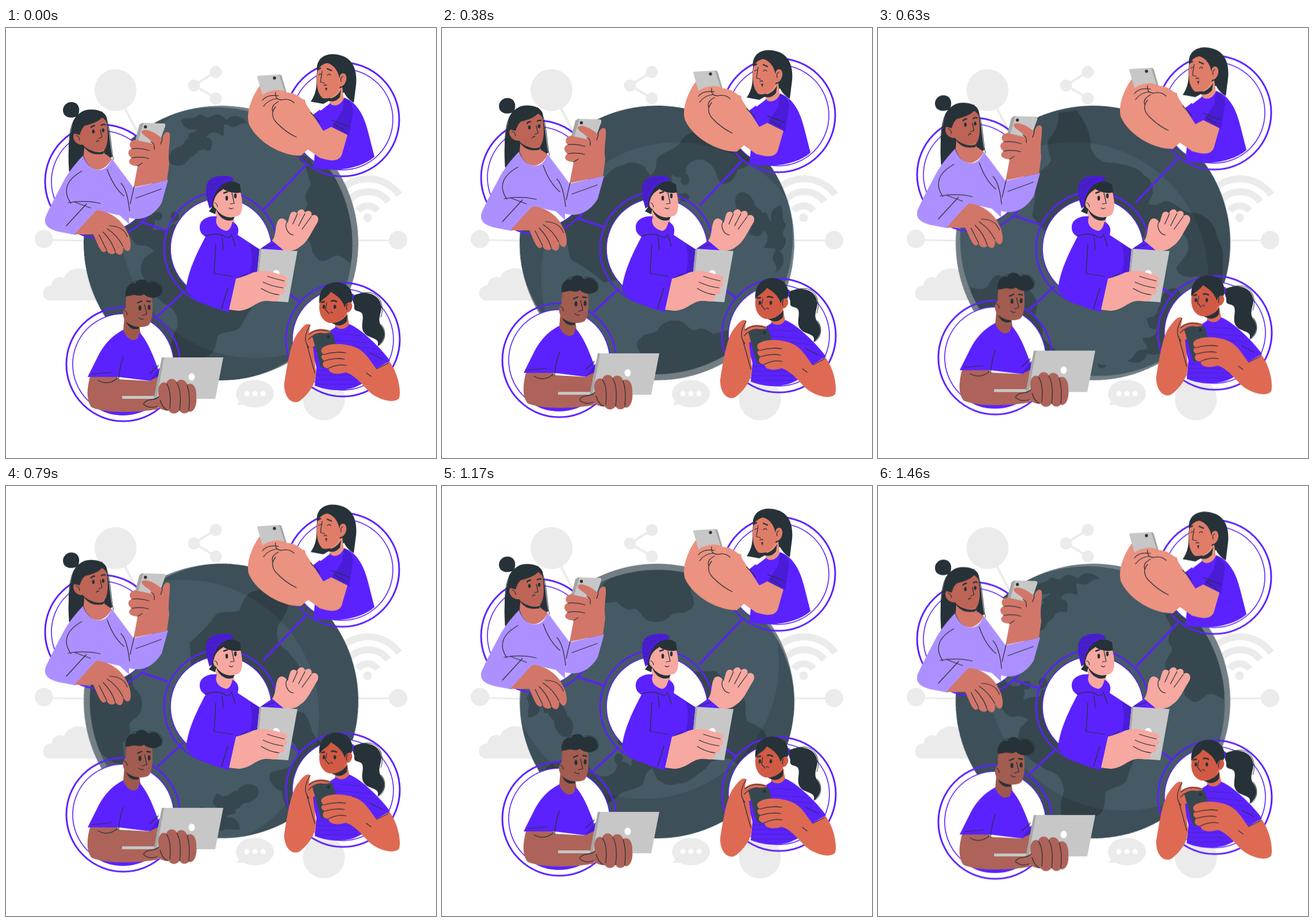
Animation of 748 by 748 pixels, one loop 1.5 s. Source, as an HTML page without scripts:

```html
<!DOCTYPE html>
<html lang="en">
<head>
<meta charset="utf-8">
<title>Connected people</title>
<style>
html, body { margin: 0; width: 100%; height: 100%; overflow: hidden; background: #fff; }
svg { display: block; width: 100%; height: 100%; }
.globe { transform-origin: 374px 374px; animation: spin 1.5s linear infinite; }
.bob { animation: bob 1.5s linear infinite; }
@keyframes spin { to { transform: rotate(360deg); } }
@keyframes bob { 50% { transform: translateY(-14px); } }
.bg { fill: #ebebeb; }
.bgline { fill: none; stroke: #ebebeb; stroke-width: 3.5; }
.land { fill: #37474f; }
.purple { fill: #5b22ff; }
.deep { fill: #4a1cd8; }
.lilac { fill: #ad90ff; }
.dark { fill: #263238; }
.grey { fill: #c7c7c7; }
.edge { fill: #a6a6a6; }
.white { fill: #fff; }
.ln { fill: none; stroke: #263238; stroke-width: 1.25; stroke-linecap: round; stroke-linejoin: round; }
.brow { stroke-width: 2.4; }
.hair { stroke-width: 1; }
.link { fill: none; stroke: #5b22ff; stroke-width: 3.5; }
</style>
</head>
<body>
<svg viewBox="0 0 748 748">
<defs>
  <clipPath id="disc"><circle cx="374" cy="374" r="239"/></clipPath>
  <clipPath id="sea"><circle cx="363.5" cy="377" r="239"/></clipPath>
  <g id="ring">
    <circle r="88" fill="#fff" stroke="#5b22ff" stroke-width="1.6"/>
    <circle r="99" fill="none" stroke="#5b22ff" stroke-width="3"/>
  </g>
</defs>

<!-- backdrop icons -->
<g class="bgline">
  <path d="M206 138L236 196M365 76L327 100L365 122" stroke-width="4"/>
  <path d="M66 368.500L140 370M608 369.500H682" stroke-width="3"/>
  <path d="M574 292A67 67 0 0 1 684 290M595 302A44 44 0 0 1 665 302M612 318A21 21 0 0 1 646 318" stroke-width="12"/>
</g>
<g class="bg">
  <circle cx="190.500" cy="108" r="36.500"/><circle cx="553" cy="646" r="36.500"/>
  <circle cx="365" cy="76.500" r="10.500"/><circle cx="327" cy="100" r="10.500"/><circle cx="365" cy="122.500" r="10.500"/>
  <circle cx="66" cy="367" r="16"/><circle cx="682" cy="369" r="16"/><circle cx="629" cy="330" r="7.500"/>
  <path d="M77 474C60 474 60 448 79 448C80 436 92 430 101 435C108 414 142 412 150 432L176 474Z"/>
  <path d="M407 648L401 656L418 655Z"/><ellipse cx="433" cy="636" rx="33" ry="24"/>
</g>
<g class="white"><circle cx="419" cy="636" r="4.500"/><circle cx="433" cy="636" r="4.500"/><circle cx="447" cy="636" r="4.500"/></g>

<!-- globe -->
<g class="globe" clip-path="url(#disc)">
  <circle cx="374" cy="374" r="239" fill="#737f85"/>
  <g clip-path="url(#sea)">
    <circle cx="374" cy="374" r="239" fill="#455a64"/>
    <g class="land">
      <path d="M241 400C234 412 232 425 240 436C242 456 262 466 275 480C292 485 300 500 299 520C288 540 284 560 289 590L319 602C324 588 334 578 349 572C362 570 366 552 369 535C382 526 404 530 410 518C418 500 428 486 445 465L430 400L290 340L262 385Z"/>
      <path d="M258 388C245 376 238 380 228 378C213 366 212 346 198 338C180 328 172 305 178 285C182 270 178 256 189 242L208 207C222 200 238 216 243 237C258 240 272 252 268 266C256 274 238 276 232 289C222 302 228 320 243 327C262 325 262 340 254 352C270 350 284 348 290 356Z"/>
      <path d="M252 326C264 314 277 324 270 333C264 339 256 332 252 326M286 326C292 314 304 322 300 334L288 339ZM244 402C252 388 270 400 264 410Z"/>
      <path d="M303 160C314 154 329 160 334 151C343 149 346 158 355 155C364 145 376 152 383 160C392 148 412 152 420 167C408 160 400 176 390 171L380 167C374 174 382 182 376 188C364 178 351 182 348 190C362 194 358 203 355 213C348 216 344 208 338 213C332 212 330 224 319 225C314 240 296 244 285 236C276 222 290 212 298 207C312 206 306 196 318 192C310 181 330 184 331 176C319 180 307 175 303 160Z"/>
      <path d="M520 240C532 230 548 240 560 246C574 256 580 270 586 283C594 292 592 312 600 330L612 360L599 409C588 400 582 392 570 396C560 403 548 410 541 399C528 390 536 374 522 367C508 358 506 340 509 329C514 318 525 314 524 304C516 292 524 282 530 272Z"/>
      <path d="M508 221C520 218 530 226 532 236C520 238 508 232 508 221M482 194C492 184 508 194 505 207C496 206 489 202 482 194M455 176C465 170 472 180 468 186Z"/>
    </g>
    <path fill="#000" opacity=".12" fill-rule="evenodd" d="M100 100H700V700H100ZM198 338a236 236 0 1 0 472 0a236 236 0 1 0 -472 0Z"/>
  </g>
</g>

<!-- rings and links -->
<g class="bob">
  <path class="link" d="M236 338L281 353M522 238L448 316M308 460L263 502M494 464L511 476"/>
  <use href="#ring" x="167" y="267"/><use href="#ring" x="585" y="159"/>
  <use href="#ring" x="204" y="585"/><use href="#ring" x="586" y="542"/>
</g>
<use href="#ring" x="374" y="384"/>

<!-- centre: man with tablet -->
<g fill="#f7a8a0">
  <path d="M366 312L363 345L381 358L399 344L394 322Z"/>
  <path class="purple" d="M337 347C337 331 356 326 367 328C362 340 370 350 383 353C390 352 392 344 394 337C404 342 406 350 403 360L441 385L463 370L490 390L475 408L436 420L424 429L402 436L388 494C360 488 326 474 313 456C316 422 334 388 347 363C340 359 337 354 337 347Z"/>
  <path class="deep" d="M441 385L437 424L424 427C428 410 430 398 424 375Z"/>
  <path class="dark" d="M365 314C374 328 388 332 398 328L395 334C382 338 370 330 365 314M356 296C362 280 384 256 407 272L409 287C395 288 384 285 378 280L369 300L364 324L353 319L358 312Z"/>
  <path d="M362 300C366 286 374 284 378 280C388 287 400 288 408 286C412 302 413 320 405 326C394 332 378 326 371 316C363 316 358 309 362 300Z"/>
  <path class="deep" d="M354 314C343 276 345 257 380 257C392 257 398 262 395 266C378 267 361 279 358 311Z"/>
  <path class="ln hair" stroke-opacity=".5" d="M350 302L358 290M349 293L362 279M348 284L368 272M348 275L376 267M352 267L383 261"/>
  <path class="ln" d="M393 287L397 305L390 306M388 313Q393 316 395 313M363 304Q367 305 368 311"/>
  <path class="ln brow" d="M379 287L385 285M398 284L403 284"/>
  <ellipse class="dark" cx="384" cy="296" rx="2.300" ry="4.200"/><ellipse class="dark" cx="399" cy="292" rx="2.300" ry="4.200"/>
  <path class="ln" d="M365 377L362 427L394 432M347 362Q366 355 379 362Q390 368 393 358M376 365L378 385M394 363L399 380M375 488L386 452M402 436L420 427M447 383L468 376"/>
  <path d="M463 370C471 360 467 344 474 334C480 328 486 333 490 339L494 325C496 318 504 318 506 323C509 313 519 314 520 321C526 315 534 319 531 327C539 322 546 329 542 338C530 357 525 372 512 380C504 388 494 386 487 390Z"/>
  <path class="ln" d="M507 323L499 341M520 323L509 344M531 328L515 350M489 337C484 344 489 359 500 360"/>
  <path class="grey" d="M441 384L507 388L491 477L432 473Z"/><path class="edge" d="M441 384L444 385L435 474L432 473Z"/>
  <circle class="white" cx="470" cy="427" r="6"/>
  <path d="M388 490L400 436C420 432 433 421 449 423C462 423 475 428 485 431C493 434 489 440 484 440C492 443 489 452 482 452C488 458 482 466 475 464C477 474 468 477 460 475C437 471 430 490 405 492Z"/>
  <path class="ln" d="M455 432Q470 437 484 440M447 442Q464 450 482 452M444 453Q460 463 475 464"/>
</g>

<g class="bob">
  <!-- upper left: woman with bun -->
  <g fill="#d27669">
    <path class="dark" d="M111 257C107 230 108 194 116 166C117 160 120 157 123 154C106 160 96 150 100 138C106 125 124 126 127 139C128 146 126 151 124 154C148 134 177 146 176 165C181 185 181 205 185 224L139 250Z"/>
    <path class="ln hair" d="M125 151C102 174 112 230 110 248M166 145C183 158 181 205 187 229"/>
    <path d="M137 199L135 222C140 239 152 249 164 246C174 243 181 234 184 227L171 218V206Z"/>
    <path class="dark" d="M134 204C146 214 162 220 172 213L169 219C151 222 141 216 134 204Z"/>
    <path fill="#bd6456" d="M129 181C132 164 150 152 173 156C178 176 179 200 172 211C160 219 142 213 134 203C120 204 114 190 119 183C122 179 127 181 129 181Z"/>
    <path class="dark" d="M117 183C112 155 132 139 152 142C170 143 178 154 175 163C172 160 170 157 167 156C157 166 143 168 137 170C131 175 130 182 128 186Z"/>
    <path class="ln" d="M164 177L167 190L161 192M157 198Q160 195 162 196M122 187Q127 188 128 195"/>
    <path class="ln brow" d="M148 173Q150 170 154 170M166 169Q169 167 172 168"/>
    <ellipse class="dark" cx="152" cy="180" rx="2.300" ry="3.500"/><ellipse class="dark" cx="169" cy="178" rx="2.300" ry="3.500"/>
    <path class="lilac" d="M134 222C121 235 108 252 101 265C91 284 80 304 69 328C64 344 76 350 90 354L121 360L157 317L198 326L214 341V330C237 337 258 326 271 304L282 264L222 278L184 227C178 242 170 247 160 247C147 245 138 235 134 222Z"/>
    <path class="grey" d="M237 165L274 166Q278 166 277 171L257 226L217 235L233 168Z"/>
    <path class="edge" d="M237 165L239 165L219 234L215 235L232 168Z"/><circle class="dark" cx="242.500" cy="172" r="2.700"/>
    <path d="M222 277L229 240C214 240 210 231 219 226C210 221 212 211 219 210C211 204 217 193 227 195L254 201C256 194 235 187 236 180C240 173 259 180 272 193C274 181 282 178 285 184C286 200 281 215 284 236L280 265Z"/>
    <path class="ln" d="M219 210Q234 208 249 213M219 226Q234 223 248 227M252 198Q259 200 258 211M229 240L237 235M272 193L269 202"/>
    <path d="M119 359L157 317C182 319 202 334 211 355C219 370 219 389 211 388Q206 387 203 378C207 395 197 399 190 389C190 396 176 394 175 386C169 396 163 385 158 373L152 359Z"/>
    <path class="ln" d="M176 349Q194 361 203 379M169 355Q184 370 190 389M162 360L175 386M180 344Q205 345 211 363M132 249C103 265 99 285 113 305M108 304Q137 299 164 305M105 344L140 306M120 303L147 313M176 246Q187 277 205 292M200 270Q211 281 215 318M216 306L223 276M226 296L270 280"/>
  </g>

  <!-- upper right: man with phone -->
  <g fill="#eb9280">
    <path class="dark" d="M541 76C538 48 562 42 580 47C606 53 611 77 609 98L605 130C598 126 592 120 588 112L552 132L530 128C544 109 539 89 541 76Z"/>
    <path d="M566 112L562 135C574 140 584 136 588 127L585 103Z"/>
    <path class="dark" d="M553 123C567 125 577 118 583 107L581 120C572 131 561 128 553 123Z"/>
    <path fill="#e07d69" d="M543 69C550 56 571 58 579 79C584 73 594 79 592 90C590 99 585 102 581 102C577 117 564 125 551 122C539 112 539 88 543 69Z"/>
    <path class="dark" d="M541 75C544 54 575 46 588 59L593 82C584 74 580 82 580 88C578 76 571 64 559 61C552 62 546 66 543 73Z"/>
    <path class="ln" d="M550 75L547 94L554 96M544 82Q546 79 549 81M559 82Q562 78 565 82M553 100Q556 98 558 100M586 84Q581 86 583 93"/>
    <path class="ln brow" d="M543 72L547 70M559 71L566 74"/><path class="dark" d="M555 104L559 104L557 110Z"/>
    <path class="purple" d="M564 131C570 139 584 134 588 121C608 128 622 148 630 181L641 224C616 246 570 251 535 243L537 219L530 157Z"/>
    <path class="deep" d="M588 122C598 126 603 134 604 143L597 188L566 173L585 144Z"/>
    <path class="purple" d="M530 154L546 142L566 173L550 178Z"/>
    <path d="M441 101C424 125 417 152 423 168C438 199 480 223 513 222L538 200L520 125Z"/>
    <path class="grey" d="M437 85Q437 83 440 83L475 81Q479 81 480 85L488 114L446 116Z"/><path class="edge" d="M475 81Q479 81 480 85L488 112L485 112Z"/><circle class="dark" cx="467" cy="87" r="2.700"/>
    <path d="M444 119C452 109 478 104 487 112C502 112 516 121 523 134L552 179L566 172L594 186L584 221C577 236 557 229 546 226L521 208C489 197 463 177 461 158L465 140Z"/>
    <path class="ln" d="M446 126Q454 115 474 118M448 136Q457 124 471 123M469 112Q467 125 480 125Q493 122 501 130M474 128Q460 135 464 145M469 137Q458 150 470 164Q486 181 505 190M530 147L546 164M566 160L597 172M570 166L589 179"/>
  </g>

  <!-- lower left: man with laptop -->
  <g fill="#ad6359">
    <path class="purple" d="M145 637H262L250 660C224 679 177 678 157 659Z"/>
    <path fill="#9d584b" d="M206 502L204 526C208 539 218 546 226 543L234 532L231 510Z"/>
    <path class="dark" d="M209 511C216 517 225 520 233 517L231 523C220 526 213 521 209 511Z"/>
    <path fill="#a25c50" d="M209 466C220 459 242 460 254 469C256 489 255 510 248 517C236 523 218 520 212 512C202 508 201 490 208 487Z"/>
    <path class="dark" d="M208 467C206 448 218 443 225 444C231 434 243 437 247 444C262 437 274 451 270 462C264 473 246 470 240 463C232 469 223 462 220 465Z"/>
    <path class="ln hair" d="M248 441C268 438 277 453 269 465M212 450Q222 437 236 440"/>
    <path class="ln" d="M241 481L245 498L237 500M231 504Q236 508 239 506M205 491Q210 492 211 499"/>
    <path class="ln brow" d="M229 478L236 475M245 475L251 476"/>
    <ellipse class="dark" cx="233" cy="487" rx="2.500" ry="4.500"/><ellipse class="dark" cx="249" cy="486" rx="2.500" ry="4.500"/>
    <path class="purple" d="M204 525C181 537 169 554 161 569L142 607L195 607L252 614L268 603C258 574 247 545 232 529C231 549 211 547 204 525Z"/>
    <path d="M146 607C140 630 140 649 149 660C175 671 231 669 264 663L270 625L262 620L266 600L251 614L195 611L194 607Z"/>
    <path class="deep" d="M267 591L266 606L250 613Z"/>
    <path class="ln" d="M204 572Q197 591 196 612M150 602L183 599M160 613Q178 623 194 609M250 601L265 587"/>
    <path class="grey" d="M202 640H262V645H202ZM273 573H378L364 645H258Z"/><path class="edge" d="M271 573H275L262 645H257Z"/>
    <ellipse class="white" cx="323" cy="607" rx="5.500" ry="6.500"/>
    <path d="M239 654C241 645 257 649 266 641C262 626 269 612 279 618C281 609 293 608 297 616C302 608 313 612 315 620C325 615 332 626 331 640C333 656 327 670 318 667C312 673 304 670 302 665C296 674 286 671 283 665C274 667 267 661 262 658Z"/>
    <path class="ln" d="M239 654C245 643 258 650 266 641M240 655Q250 663 263 658M268 647Q273 663 282 665M279 619Q288 630 285 662M297 617Q306 631 302 665M315 621Q321 638 318 665"/>
  </g>

  <!-- lower right: woman with ponytail -->
  <g fill="#de6a54">
    <path class="dark" d="M601 467C626 454 651 463 653 485C653 498 645 507 653 518C662 530 659 545 646 554C651 541 640 541 628 535C612 523 625 507 619 496C613 490 604 495 606 483Z"/>
    <path class="ln hair" d="M607 466C646 446 661 480 652 503M653 516C664 530 658 547 649 552"/>
    <path class="purple" d="M601 462L605 463L604 474L600 475Z"/>
    <path d="M574 504L572 523C580 531 592 526 597 516L592 490Z"/>
    <path class="dark" d="M565 512C579 514 588 506 594 498L593 510C583 522 573 517 565 512Z"/>
    <path fill="#d15a45" d="M546 476C548 454 576 448 588 482C594 474 604 475 602 486C600 493 595 496 591 495C588 508 576 515 562 513C546 508 543 490 546 476Z"/>
    <path class="dark" d="M545 479C543 449 563 439 583 443C602 449 605 465 601 478C596 475 592 479 589 486C586 474 577 466 565 459C561 467 551 470 545 479Z"/>
    <path class="ln" d="M558 478L556 490L562 497M564 495Q567 493 568 496M594 481Q591 484 593 490"/>
    <path class="ln brow" d="M549 477L554 476M566 475Q570 473 575 476"/><ellipse class="dark" cx="553" cy="485" rx="2.300" ry="3.500"/><ellipse class="dark" cx="572" cy="485" rx="2.300" ry="3.500"/>
    <path class="purple" d="M574 520C584 527 593 522 597 515C617 523 650 554 668 579L644 593L623 616C600 634 562 633 537 622L540 590L529 548Z"/>
    <path class="ln hair" stroke-opacity=".45" d="M577 532L619 535M570 543L635 548M562 550L645 558M541 596H618M539 604H622M538 612H619M540 620H610"/>
    <path d="M529 516C522 512 515 521 509 529C495 545 490 583 484 618C483 644 499 657 512 648C529 634 540 617 539 596L534 554L556 548L565 527C551 521 536 523 527 531Z"/>
    <path class="ln" d="M529 517C519 533 518 546 527 556M527 533Q541 521 563 528M526 542Q539 528 554 532M523 549L537 600"/>
    <path fill="#37474f" d="M536 533L564 530Q568 530 569 534L584 587L553 592Q549 592 547 588L533 537Z"/><circle class="dark" cx="561" cy="537" r="2.700"/>
    <path d="M551 556C563 546 596 549 611 557C627 565 635 581 644 593L667 580C680 597 688 627 684 644C674 655 646 646 631 632C614 614 606 604 591 599C575 604 561 601 561 592C550 592 549 583 554 579C546 574 548 568 553 568C547 564 547 559 551 556Z"/>
    <path class="ln" d="M553 568Q572 562 591 565M554 579Q572 573 589 576M561 592Q575 584 592 587M633 565L655 576M645 593L665 583M627 600L635 606"/>
  </g>
</g>
</svg>
</body>
</html>
```
